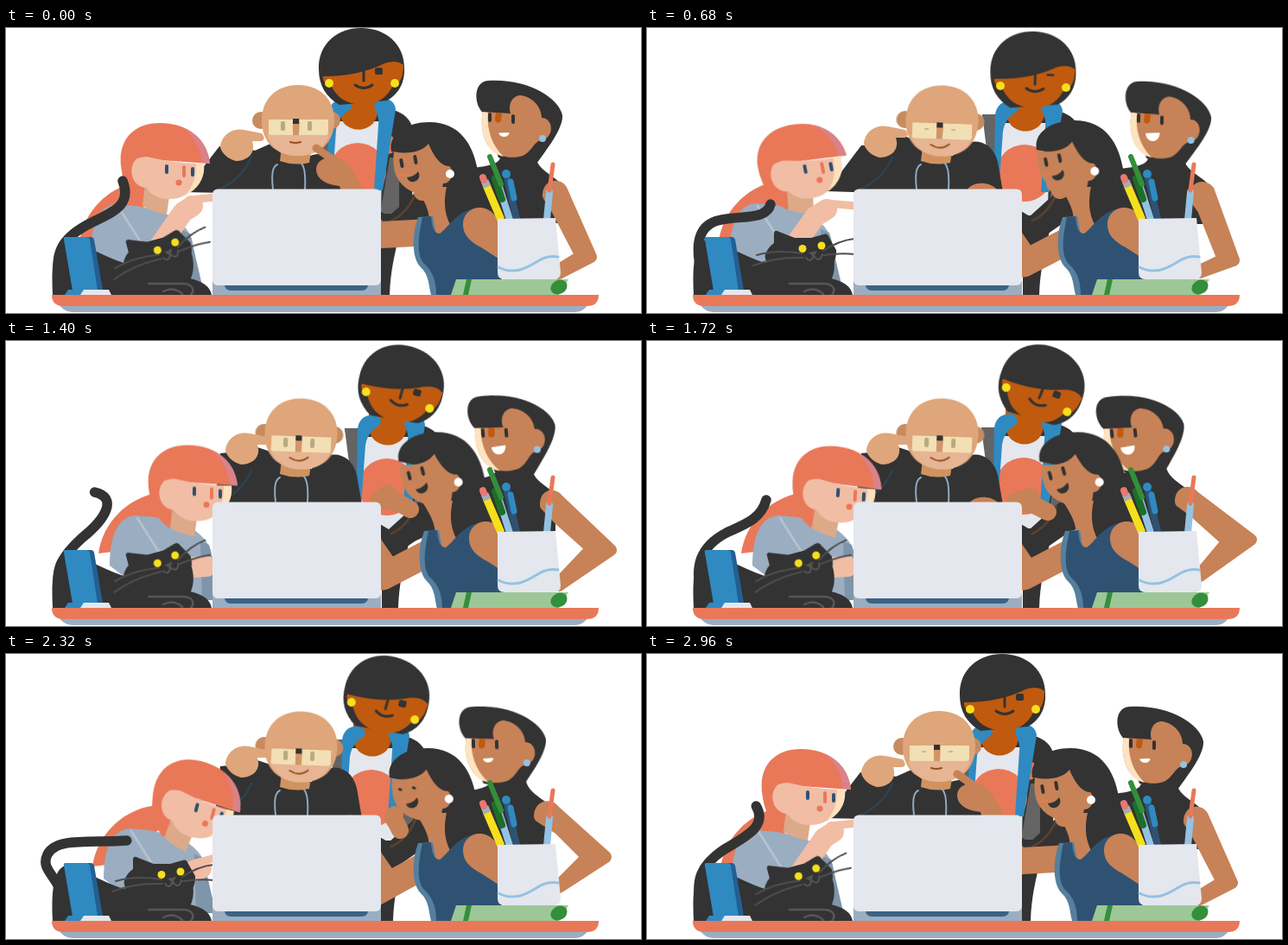
These frames come from a looping animation (735x330 px, 3000 ms). An HTML page:

```html
<!DOCTYPE html>
<html lang="en">
<head>
<meta charset="utf-8">
<title>Around the laptop</title>
<style>
html, body { margin: 0; width: 100%; height: 100%; overflow: hidden; background: #fff; }
svg { display: block; width: 735px; height: 330px; }
svg * { animation: 3s cubic-bezier(.35, .12, .65, .88) infinite; }
.ink { fill: #333; } .brown { fill: #c78257; } .tan { fill: #dea67a; } .pink { fill: #f1bda5; }
.coral { fill: #e97859; } .pale { fill: #e4e7ed; } .steel { fill: #9badc1; } .blue { fill: #2f8ac1; }
.navy { fill: #2f5273; } .rust { fill: #c05a0e; } .sun { fill: #f6e01d; } .sky { fill: #94c2e2; }
.line { fill: none; stroke-linecap: round; stroke-linejoin: round; }

#tail { animation-name: tail; animation-duration: 1.5s; animation-timing-function: linear; }
@keyframes tail {
  0%, 100% { d: path("M62 290C56 262 64 245 92 229C120 214 147 208 135 177"); }
  14.7% { d: path("M62 290C56 262 60 239 92 222C114 212 132 206 138 184"); }
  45.3% { d: path("M64 290C58 264 52 228 86 222C112 217 139 222 143 204"); }
  54.7% { d: path("M66 290C65 258 38 252 48 232C58 212 98 219 140 216"); }
  66.7% { d: path("M78 290C84 242 64 238 48 241C18 244 24 210 62 209"); }
  76% { d: path("M68 290C68 252 48 246 30 236C6 222 2 198 16 182"); }
  86% { d: path("M64 290C62 260 60 248 58 232C54 206 48 190 54 172"); }
  93.3% { d: path("M62 290C56 264 66 248 88 228C118 204 128 180 102 175"); }
  97.3% { d: path("M62 290C56 262 62 245 88 227C112 212 140 200 126 176"); }
}
#catHead { animation-name: catHead; animation-duration: 1.5s; transform-origin: 191px 253.5px; }
@keyframes catHead {
  0%, 20%, 90%, 100% { transform: translate(-5.5px, -1px) rotate(-15deg); }
  38%, 72% { transform: none; }
}
#girlHead { animation-name: girlHead; transform-origin: 201px 164.5px; }
@keyframes girlHead {
  0%, 98.7%, 100% { transform: none; }
  22.7% { transform: translate(-3px, -3px) rotate(-11deg); }
  33.3% { transform: translate(2.5px, -.5px) rotate(-8deg); }
  46.7% { transform: translate(32px, 10.5px); }
  57.3% { transform: translate(35px, 13px) rotate(3.5deg); }
  77.3% { transform: translate(34px, 18px) rotate(14deg); }
}
#girlBody { animation-name: girlBody; }
@keyframes girlBody {
  0%, 98.7%, 100% { transform: none; }
  22.7% { transform: translate(-2px, -1px); }
  33.3% { transform: translate(4px, 0); }
  46.7% { transform: translate(22px, -2px); }
  57.3% { transform: translate(24px, -2px); }
  77.3% { transform: translate(15px, -2px); }
}
#girlArm { animation-name: girlArm; }
@keyframes girlArm {
  0%, 98.7%, 100% { d: path("M178 252L205 213L216 206"); }
  22.7% { d: path("M172 250L195 218L208 210"); }
  33.3% { d: path("M174 252L200 218L212 209"); }
  46.7%, 57.3% { d: path("M190 264L215 262L232 261"); }
  77.3% { d: path("M185 262L208 255L226 248"); }
}
#girlFinger { animation-name: girlFinger; }
@keyframes girlFinger {
  0%, 98.7%, 100% { d: path("M212 199L242 196"); }
  22.7% { d: path("M208 203L242 206"); }
  33.3% { d: path("M212 201L242 201"); }
  46.7%, 57.3% { d: path("M226 254L242 256"); }
  77.3% { d: path("M214 244L242 236"); }
}
#baldHead { animation-name: baldHead; transform-origin: 338px 107px; }
@keyframes baldHead {
  0%, 98.7%, 100% { transform: none; }
  22.7%, 77.3% { transform: translate(3.5px, .5px) rotate(2deg); }
}
#baldFace { animation-name: baldFace; }
@keyframes baldFace {
  0%, 98.7%, 100% { transform: none; }
  22.7%, 77.3% { transform: translate(0, 4px); }
}
#smile { animation-name: smile; }
@keyframes smile {
  0%, 98.7%, 100% { d: path("M329 132Q335 134 341 132"); }
  22.7%, 77.3% { d: path("M326 131Q337 138 347 130"); }
}
#baldBody { animation-name: baldBody; }
@keyframes baldBody {
  0%, 98.7%, 100% { d: path("M255 190L288 142L306 134L322 148L352 148C368 142 384 150 388 165L390 190Z"); }
  22.7%, 77.3% { d: path("M255 190L288 122L306 128L324 148L354 148C366 126 398 124 406 155L412 190Z"); }
}
#baldSleeve { animation-name: baldSleeve; }
@keyframes baldSleeve {
  0%, 98.7%, 100% { d: path("M247 137L206 190L300 192L325 155L290 142Z"); }
  22.7% { d: path("M248 136L208 189L300 192L325 155L290 134Z"); }
  33.3% { d: path("M248 134L212 190L300 192L325 150L290 126Z"); }
  46.7%, 77.3% { d: path("M248 130L242 186L300 192L325 150L290 126Z"); }
}
#baldHand { animation-name: baldHand; }
@keyframes baldHand {
  0%, 98.7%, 100% { transform: none; }
  22.7% { transform: translate(3px, -4px); }
  33.3%, 77.3% { transform: translate(6px, -11px); }
}
.cord { animation-name: cord; }
@keyframes cord {
  0%, 98.7%, 100% { transform: none; }
  22.7%, 77.3% { transform: translate(3px, 0); }
}
.blink { animation-name: blink; animation-timing-function: linear; transform-origin: 336px 113px; }
@keyframes blink {
  0%, 20%, 25.3%, 96%, 100% { transform: none; }
  22%, 23.3%, 98%, 99% { transform: scaleY(.15); }
}
#tallHead { animation-name: tallHead; transform-origin: 412px 64px; }
@keyframes tallHead {
  0%, 98.7%, 100% { transform: none; }
  22.7% { transform: translate(35px, 4px) rotate(1.5deg); }
  33.3% { transform: translate(42.5px, 5px) rotate(3deg); }
  46.7% { transform: translate(41.5px, 4.5px) rotate(14.6deg); }
  57.3% { transform: translate(39px, 4px) rotate(21.8deg); }
  77.3% { transform: translate(24.5px, 2px) rotate(15.3deg); }
}
#tallBody { animation-name: tallBody; }
@keyframes tallBody {
  0%, 98.7%, 100% { transform: none; }
  22.7% { transform: translate(30px, 2px); }
  33.3% { transform: translate(37px, 3px); }
  46.7% { transform: translate(34px, 3px); }
  57.3% { transform: translate(29px, 2px); }
  77.3% { transform: translate(16px, 1px); }
}
#tallLegs { animation-name: tallLegs; }
@keyframes tallLegs {
  0%, 98.7%, 100% { transform: none; }
  22.7%, 57.3% { transform: translate(10px, 0); }
  77.3% { transform: translate(4px, 0); }
}
#wink { animation-name: wink; transform-origin: 431px 50px; }
@keyframes wink {
  0%, 17%, 40%, 100% { transform: none; }
  20%, 36% { transform: scaleY(.35); }
}
#friendHair { animation-name: friendHair; }
@keyframes friendHair {
  0%, 98.7%, 100% { transform: none; }
  22.7% { transform: translate(5px, -2px); }
  33.3%, 57.3% { transform: translate(8.5px, -3.5px); }
  77.3% { transform: translate(-2px, 0); }
}
#friendFace { animation-name: friendFace; transform-origin: 480px 160px; }
@keyframes friendFace {
  0%, 98.7%, 100% { transform: none; }
  22.7% { transform: translate(4px, -2px) rotate(-2deg); }
  33.3%, 57.3% { transform: translate(9px, -2.5px) rotate(-5deg); }
  77.3% { transform: translate(-1.5px, 0) rotate(-2deg); }
}
#friendBody { animation-name: friendBody; }
@keyframes friendBody {
  0%, 77.3%, 98.7%, 100% { transform: none; }
  22.7% { transform: translate(4px, 0); }
  33.3%, 57.3% { transform: translate(7px, 1px); }
}
#friendEyes { animation-name: friendEyes; transform-origin: 466px 156px; }
@keyframes friendEyes {
  0%, 74%, 81%, 100% { transform: none; }
  76%, 79% { transform: scaleY(.3); }
}
#friendArm { animation-name: friendArm; }
@keyframes friendArm {
  0%, 98.7%, 100% { d: path("M500 236L425 240"); }
  22.7%, 57.3% { d: path("M488 246L436 273"); }
  77.3% { d: path("M486 244L428 276"); }
}
#poke { animation-name: poke; }
@keyframes poke {
  0%, 98.7%, 100% { transform: none; }
  22.7% { transform: translate(10px, 30px); }
  33.3% { transform: translate(22px, 39px); }
  46.7%, 77.3% { transform: translate(20px, 37px); }
  57.3% { transform: translate(12px, 31px); }
}
#pokeFinger { animation-name: pokeFinger; }
@keyframes pokeFinger {
  0%, 98.7%, 100% { transform: none; }
  18%, 80% { transform: translate(18px, 22px); }
}
#palm { animation-name: palm; }
@keyframes palm {
  0%, 98.7%, 100% { d: path("M482 190L480 184L478 180L480 178"); }
  22.7% { d: path("M478 188L476 182L472 180L472 175"); }
  33.3% { d: path("M474 188L466 182L460 172L458 160"); }
  46.7% { d: path("M468 195L454 187L432 184L442 176"); }
  57.3% { d: path("M464 198L448 190L426 186L444 180"); }
  77.3% { d: path("M456 204L452 196L448 190L450 186"); }
}
#sideHead { animation-name: sideHead; transform-origin: 595px 105px; }
@keyframes sideHead {
  0%, 98.7%, 100% { transform: none; }
  22.7% { transform: translate(9px, 1.5px) rotate(1deg); }
  33.3% { transform: translate(10px, 1.5px) rotate(1deg); }
  46.7% { transform: translate(-8px, 0) rotate(-5deg); }
  57.3% { transform: translate(-22px, 0) rotate(-6deg); }
  77.3% { transform: translate(-19px, -1px) rotate(-2deg); }
}
#sideBody { animation-name: sideBody; }
@keyframes sideBody {
  0%, 98.7%, 100% { transform: none; }
  22.7%, 33.3% { transform: translate(8px, 1px); }
  46.7% { transform: translate(-4px, -1px); }
  57.3% { transform: translate(-12px, -4px); }
  77.3% { transform: translate(-11px, -3px); }
}
#sideArm { animation-name: sideArm; }
@keyframes sideArm {
  0%, 98.7%, 100% { d: path("M628 194C627 184 638 180 643 188L677 265L640 284L640 280L666 264L637 208Z"); }
  22.7% { d: path("M634 196C633 186 644 181 650 189L679 269L640 283L640 281L667 268L644 210Z"); }
  33.3% { d: path("M635 196C634 186 644 180 650 188L692 264L640 281L640 279L677 261L644 208Z"); }
  46.7% { d: path("M625 190C624 180 633 176 639 184L700 242L640 283L642 278L678 240L640 206Z"); }
  57.3% { d: path("M618 186C617 176 627 172 633 180L699 230L640 272L642 268L672 232L634 198Z"); }
  77.3% { d: path("M618 188C617 178 629 173 635 182L694 235L640 270L642 266L673 235L640 202Z"); }
}
#grin { animation-name: grin; transform-origin: 576px 122px; }
@keyframes grin {
  0%, 77.3%, 98.7%, 100% { transform: scale(.8, .55); }
  22.7%, 57.3% { transform: scale(1.1); }
}
</style>
</head>
<body>
<svg viewBox="0 0 735 330">
  <g>
    <g id="sideBody">
      <path class="ink" d="M572 138L612 146C614 162 626 166 640 178L640 226H540V162C556 160 570 158 572 150Z"/>
    </g>
    <path id="sideArm" class="brown" stroke="#c78257" stroke-width="14" stroke-linejoin="round"/>
    <g id="sideHead">
      <path class="ink" d="M552 98C541 88 541 62 558 61C602 58 640 80 644 101C645 116 628 138 612 160L570 150Z"/>
      <path class="brown" d="M552 97L584 99C581 88 586 78 596 78C610 80 620 92 620 104C634 104 635 127 620 130C611 131 609 143 598 148C586 152 567 150 558 136C551 126 549 108 552 97Z"/>
      <path fill="#fde3bf" d="M552 97L558 98C556 116 562 136 576 149C567 147 561 142 558 136C551 126 549 108 552 97Z"/>
      <path class="rust" d="M567 98H574L573 108Q567 112 566 106Z"/>
      <rect class="ink" x="558" y="98" width="4" height="11" rx="2"/>
      <rect class="ink" x="585" y="100" width="4" height="11" rx="2"/>
      <path id="grin" fill="#fff" d="M569 121L584 120C584 132 570 132 569 121Z"/>
      <circle class="sky" cx="621" cy="128" r="4"/>
    </g>
  </g>

  <g>
    <path id="tallLegs" class="ink" d="M425 235H456C450 262 445 280 444 309H425Z"/>
    <g id="tallBody">
      <path class="ink" d="M358 98H380L448 95C460 98 470 106 471 120L470 215L425 235H380Z"/>
      <path fill="#646464" d="M358 98H374L371 190L362 130ZM444 150H455V215H433Z"/>
      <path class="pale" d="M381 108H436L434 215H374Z"/>
      <circle class="coral" cx="407" cy="166" r="33"/>
      <circle class="coral" cx="441" cy="135" r="11"/>
      <path class="rust" d="M386 72V95C386 125 430 125 430 95V72Z"/>
      <path class="blue" d="M396 83C380 80 372 90 373 104L371 188H377L382 118C386 96 400 98 400 90ZM427 84C430 78 450 80 451 94L436 188H426L431 112C433 100 424 95 427 84Z"/>
    </g>
    <path class="ink" d="M426 208L443 218L485 180H512V205L447 250L426 240Z"/>
    <path class="line" d="M446 223Q464 215 474 192" stroke="#59402f" stroke-width="3"/>
    <g id="tallHead">
      <path class="ink" d="M362 48C361 18 384 0 411 0C441 0 461 20 461 46C462 66 452 78 441 84L386 89C370 80 362 66 362 48Z"/>
      <path class="rust" d="M367 56C396 56 420 50 438 41Q452 36 460 43C460 56 456 66 448 66C442 78 434 88 412 89C394 88 382 80 376 66C369 65 366 60 367 56Z"/>
      <path class="line" d="M414 50V61M404 66Q414 73 424 66" stroke="#333" stroke-width="3"/>
      <rect id="wink" class="ink" x="427" y="46" width="9" height="8" rx="2"/>
      <circle class="sun" cx="374" cy="64" r="5"/>
      <circle class="sun" cx="450" cy="64" r="5"/>
    </g>
  </g>

  <g>
    <path id="baldSleeve" class="ink"/>
    <path id="baldBody" class="ink"/>
    <path class="line" d="M246 187C262 180 276 168 284 150" stroke="#2d4350" stroke-width="2.5"/>
    <path d="M319 138H354L351 156Q334 160 317 154Z" fill="#d0935f"/>
    <path class="line cord" d="M309 186C307 170 309 160 314 158M346 187C347 170 345 160 342 157" stroke="#8fa9c0" stroke-width="2"/>
    <g id="baldHead">
      <circle fill="#c78b60" cx="295" cy="107" r="10"/>
      <circle fill="#c78b60" cx="377" cy="107" r="10"/>
      <path class="tan" d="M296 107C296 82 313 66 338 66S380 82 380 107C380 132 364 148 338 148S296 132 296 107Z"/>
      <path fill="#e7b594" d="M302 124H374C368 141 355 148 338 148S308 141 302 124Z"/>
      <g id="baldFace">
        <rect fill="#d29567" x="332" y="108" width="8" height="16"/>
        <path fill="#f2dfb3" d="M304 106H332V124H306Q304 124 304 122ZM340 106H373V121Q373 124 370 124H339Z"/>
        <rect class="ink" x="332" y="105" width="7" height="6"/>
        <g class="blink" fill="#b5ab82">
          <rect x="318" y="108" width="5" height="11" rx="2"/>
          <rect x="349" y="108" width="5" height="11" rx="2"/>
        </g>
        <path id="smile" class="line" stroke="#94501f" stroke-width="2"/>
      </g>
    </g>
    <g id="baldHand" class="tan">
      <path d="M248 138C249 124 262 115 276 118L296 122Q302 129 295 131L285 131C290 145 279 154 266 154C258 152 250 146 248 138Z"/>
    </g>
  </g>

  <g class="brown">
    <g id="poke">
      <path id="pokeFinger" class="line" d="M359 139L382 155" stroke="#c78257" stroke-width="9"/>
      <path d="M359 163C360 148 384 146 394 156C401 166 408 174 415 194L440 230H400L386 183C370 181 359 175 359 163Z"/>
    </g>
    <path id="friendArm" class="line" stroke="#c78257" stroke-width="31"/>
  </g>

  <g>
    <path id="friendHair" class="ink" d="M446 143C442 124 462 109 490 109C526 109 541 136 546 165C550 182 560 195 556 214C545 218 528 216 518 236C508 238 500 200 495 190L480 150Z"/>
    <g id="friendBody">
      <path class="brown" d="M474 184H510C505 206 510 222 517 232L502 246L487 236C494 218 487 204 474 184Z"/>
      <path fill="#557f9d" d="M477 219C469 240 470 268 480 277C490 286 489 298 492 309H510L494 218Z"/>
      <path class="navy" d="M482 219L492 218C493 230 495 238 502 238C512 232 520 211 548 208L574 250V309H498C498 290 492 280 484 273C474 262 478 238 482 219Z"/>
      <path class="brown" d="M529 228C529 208 552 202 564 215L590 240V280L550 254C538 248 529 240 529 228Z"/>
    </g>
    <path id="palm" class="line" stroke="#c78257" stroke-width="20"/>
    <g id="friendFace">
      <path class="brown" d="M449 143C466 147 482 143 489 134C495 148 503 160 513 160C520 166 516 180 506 180L503 193C480 196 461 190 452 172C448 164 448 150 449 143Z"/>
      <g id="friendEyes" class="ink">
        <rect x="456" y="151" width="4" height="11" rx="2" transform="rotate(-10 458 157)"/>
        <rect x="472" y="147" width="4" height="11" rx="2" transform="rotate(-10 474 153)"/>
      </g>
      <path class="line" d="M456 171L463 170" stroke="#e97859" stroke-width="2"/>
      <path class="ink" d="M464 173Q473 172 477 166C483 176 468 184 464 173Z"/>
      <circle fill="#fff" cx="514" cy="169" r="5"/>
    </g>
  </g>

  <g>
    <g id="girlBody">
      <path class="coral" d="M148 179C118 186 90 212 85 248L110 245L164 204V176Z"/>
      <path class="steel" d="M128 204C108 206 98 226 98 262L150 302H226L215 244C206 222 186 212 150 206Z"/>
      <path fill="#7e95aa" d="M203 234L213 238L228 302H205Z"/>
      <path class="line" d="M130 207L156 248" stroke="#b4c1cf" stroke-width="3"/>
    </g>
    <g id="girlHead">
      <path fill="#dcaa88" d="M158 180L190 188L186 216Q166 212 155 204Z"/>
      <path class="coral" d="M134 166C127 130 148 110 178 110C212 110 234 130 236 157L164 152L158 206C148 202 136 184 134 166Z"/>
      <path fill="#d9828a" d="M236 157C234 137 222 122 206 116C220 128 226 142 227 156Z"/>
      <path class="pink" d="M163 149Q196 157 229 157C231 180 210 198 190 198C172 198 166 190 162 185C145 184 140 160 152 151Q158 149 163 149Z"/>
      <path fill="#fce1be" d="M220 157H229C231 174 222 187 207 194C217 183 221 170 220 157Z"/>
      <g class="navy">
        <rect x="184" y="158" width="4" height="11" rx="2"/>
        <rect x="214" y="161" width="4" height="11" rx="2"/>
      </g>
      <path class="line" d="M206 161V171" stroke="#e97859" stroke-width="4"/>
      <circle class="coral" cx="200" cy="179" r="3.5"/>
    </g>
    <path id="girlArm" class="line" stroke="#f1bda5" stroke-width="24"/>
    <path id="girlFinger" class="line" stroke="#f1bda5" stroke-width="9"/>
  </g>

  <g>
    <path id="tail" class="line" stroke="#333" stroke-width="11.5"/>
    <path class="ink" d="M54 309C52 270 56 246 72 244C88 250 108 262 136 272L166 262L205 288C224 292 236 297 238 309Z"/>
    <path class="ink" d="M140 268L215 262C220 280 214 296 205 300H150Z"/>
    <path class="line" d="M165 296H202C214 295 220 302 214 309M182 305Q194 299 204 308" stroke="#565656" stroke-width="2.5"/>
    <g id="catHead">
      <path class="ink" d="M147 237Q148 233 153 236L171 243H190L204 239Q209 237 211 243L219 257C220 276 206 286 182 284C152 284 134 274 137 262Q140 254 147 249Z"/>
      <path class="line" d="M204 258Q222 246 240 244M205 263Q224 260 241 262M180 261Q150 256 127 263M181 266Q148 265 123 275" stroke="#4e4e4e" stroke-width="2"/>
      <path class="line" d="M184 266Q189 273 193 264Q200 273 203 262" stroke="#565656" stroke-width="2"/>
      <path fill="#565656" d="M187 260L197 258L193 265Z"/>
      <circle class="sun" cx="180" cy="255.5" r="4.5"/>
      <circle class="sun" cx="202" cy="252" r="4.5"/>
    </g>
  </g>

  <path class="steel" d="M59 316Q65 329 78 329H658Q670 329 676 316Z"/>
  <path class="coral" d="M53 309H686Q686 322 672 322H67Q53 322 53 309Z"/>
  <rect class="steel" x="239" y="290" width="195" height="19"/>
  <rect class="pale" x="239" y="186.5" width="195" height="111.5" rx="6"/>
  <path fill="#3b6384" d="M253 298H419Q418 304 411 304H261Q254 304 253 298Z"/>

  <path fill="#235f93" d="M92 242H98Q101 242 102 245L112 303H100Z"/>
  <path class="blue" d="M69 242H93Q96 242 97 245L106 304H77L67 245Q66 242 69 242Z"/>
  <path class="blue" d="M72 303H92L88 309H68Z"/>
  <path class="pale" d="M90 303H119L122 309H86Z"/>

  <path fill="#9dc796" d="M521 291H651L640 309H515Z"/>
  <path fill="#338f3a" d="M533 291H539L535 309H529Z"/>
  <ellipse fill="#338f3a" cx="640" cy="300" rx="10" ry="8" transform="rotate(-28 640 300)"/>
  <g class="line" stroke-width="8">
    <path d="M569 178L584 225" stroke="#94c2e2"/>
    <path d="M580 174L592 225" stroke="#2f5273"/>
    <path d="M584 178L588 197" stroke="#2f8ac1" stroke-width="7"/>
    <path d="M566 174L574 198" stroke="#1f6e28"/>
    <path d="M560 149L573 181" stroke="#338f3a" stroke-width="6"/>
    <path d="M556 182L573 222" stroke="#f6e01d" stroke-width="9" stroke-linecap="butt"/>
    <path d="M554 177L557 184" stroke="#a5adb5" stroke-width="9" stroke-linecap="butt"/>
    <path d="M552 173L553 176" stroke="#e97872" stroke-width="8"/>
    <path d="M629 190L626 222" stroke="#94c2e2"/>
    <path d="M633 158L629 188" stroke="#e97859" stroke-width="5"/>
  </g>
  <circle class="blue" cx="579" cy="169" r="5"/>
  <path class="pale" d="M569 221L636 220L642 283Q642 291 634 291H577Q569 291 569 283Z"/>
  <path class="line" d="M570 277C592 288 608 274 619 268Q629 263 639 265" stroke="#94c2e2" stroke-width="3"/>
</svg>
</body>
</html>
```
